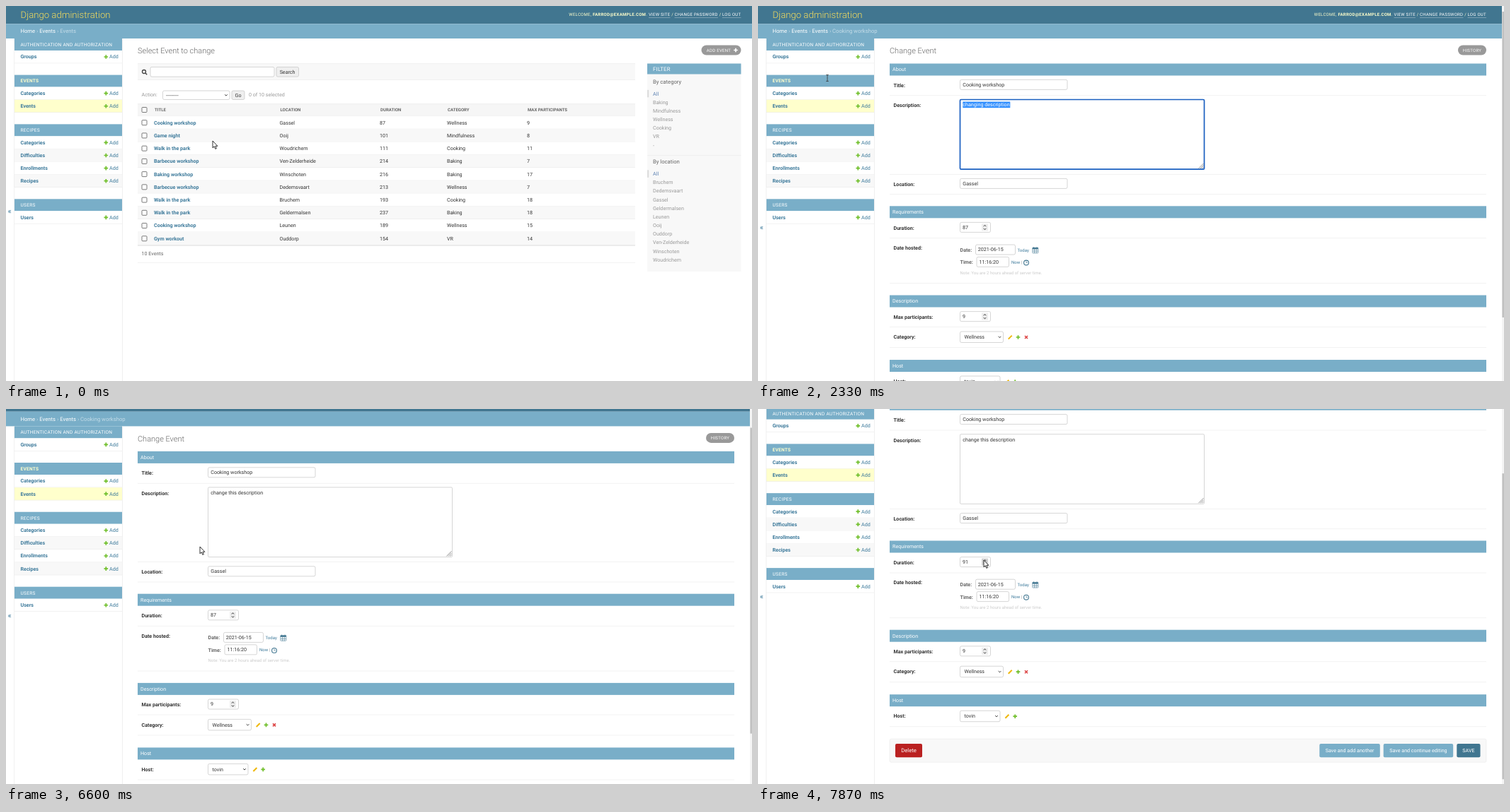
Animation of 1054 by 531 pixels, one loop 8 s. Source, as an HTML page:

```html
<!DOCTYPE html>
<html lang="en">
<head>
<meta charset="utf-8">
<title>Django administration</title>
<style>
  html, body { margin: 0; width: 100%; height: 100%; overflow: hidden; background: #fff; }
  svg { display: block; width: 1054px; height: 531px; }
  text { font: 7.14px Roboto, sans-serif; fill: #333; white-space: pre; text-rendering: geometricPrecision; }
  .b { font-weight: 700; }
  .s { font-size: 6.04px; }
  .m { font-size: 7.69px; }
  .cap { font-size: 6.59px; }
  .h1 { font-size: 10.98px; font-weight: 300; fill: #666; }
  .ls { letter-spacing: .27px; }
  .w { fill: #fff; }
  .link { fill: #3d7a9b; }
  .mute { fill: #999; }
  .grey { fill: #666; }
  .mid { text-anchor: middle; }
  .end { text-anchor: end; }
</style>
</head>
<body>
<svg id="stage" viewBox="0 0 1054 531"></svg>
<script>
const BLUE = '#79aec8', DARK = '#417690', LINE = '#eaeaea';

// ---- drawing helpers: text is placed by the centre of its line ----
const text = (x, cy, s, cls = '', more = '') =>
  `<text x="${x}" y="${cy}" dy=".342em" class="${cls}" ${more}>${s}</text>`;
const rect = (x, y, w, h, fill, r = 0, stroke = 'none', more = '') =>
  `<rect x="${x}" y="${y}" width="${w}" height="${h}" rx="${r}" fill="${fill}" stroke="${stroke}" stroke-width=".6" ${more}/>`;
const path = (d, stroke, width = 1, fill = 'none', more = '') =>
  `<path d="${d}" fill="${fill}" stroke="${stroke}" stroke-width="${width}" ${more}/>`;
const field = (x, y, w, h = 14) => rect(x, y, w, h, '#fff', 2, '#bbb');
const rule = (x, y, w, color = LINE) => rect(x, y, w, .6, color);
const plus = (x, y, color = '#70bf2b') => path(`M${x - 2.8} ${y}h5.6M${x} ${y - 2.8}v5.6`, color, 1.7);
const pencil = (x, y) => path(`M${x - 2.6} ${y + 2.6}l5-5`, '#efb80b', 2);
const cross = (x, y) => path(`M${x - 2} ${y - 2}l4 4m0-4l-4 4`, '#dd4646', 1.6);
const chevron = (x, y, k = 1) => path(`M${x - 1.8} ${y - .9 * k}l1.8 ${1.8 * k} 1.8 ${-1.8 * k}`, '#333', 1);
const checkbox = cy => rect(192, cy - 3.5, 7, 7, '#fff', 1, '#6b6b6b', 'style="stroke-width:.9"');
const button = (x, y, w, h, label, fill, cls = 'w') =>
  rect(x, y, w, h, fill, 2) + text(x + w / 2, y + h / 2, label, 'mid ' + cls);
const select = (x, y, w, h, label, pad) =>
  field(x, y, w, h) + text(x + pad, y + h / 2, label) + chevron(x + w - 5, y + h / 2);

function userLinks(dx) {
  const links = [[908, 30.5, 'VIEW SITE'], [944.5, 61.5, 'CHANGE PASSWORD'], [1012, 26.5, 'LOG OUT']];
  return text(906 + dx, 12, 'WELCOME, <tspan class="b">FARROD@EXAMPLE.COM</tspan>.', 's ls end', 'style="fill:#ffc"')
    + links.map(([x, w, s], i) => text(x + dx, 12, s, 's ls w') + rule(x + dx, 16.4, w, '#a0bbc8')
      + (i ? text(x - 4.3 + dx, 12, '/', 's', 'style="fill:#ffc"') : '')).join('');
}

const crumbs = (done, here) => text(20.5, 35.5,
  [...done, `<tspan style="fill:#c4dce8">${here}</tspan>`].join('<tspan style="fill:#c4dce8"> › </tspan>'), 'm w');

function sidebar() {
  const groups = { 'AUTHENTICATION AND AUTHORIZATION': ['Groups'], EVENTS: ['Categories', 'Events'],
    RECIPES: ['Categories', 'Difficulties', 'Enrollments', 'Recipes'], USERS: ['Users'] };
  let y = 46, out = '';
  for (const [title, rows] of Object.entries(groups)) {
    const current = title === 'EVENTS';
    out += rect(12, y, 152, 17, BLUE)
      + text(20.5, y + 8.6, title, 'cap ls w' + (current ? ' b' : ''), current ? 'style="fill:#ffc"' : '');
    y += 17.02;
    rows.forEach((name, i) => {
      out += rect(12, y, 152, 18.1, name === 'Events' ? '#ffc' : i % 2 ? '#f8f8f8' : '#fff')
        + rule(12, y + 17.6, 152) + text(20.5, y + 9, name, 'b link')
        + plus(141.3, y + 9) + text(146, y + 9, 'Add', 'link');
      y += 18.12;
    });
    y += 16.47;
  }
  return out;
}

function filter() {
  const list = (y, title, items) => text(914, y, title, 'm grey')
    + rect(906, y + 11.5, 2.2, 10.5, '#ddd')
    + items.split(' ').map((s, i) => text(914, y + 16.8 + 12.17 * i, s, i ? 'mute' : '', i ? '' : 'style="fill:#5b80b2"')).join('');
  return rect(906, 81.5, 132.5, 294.5, '#f8f8f8') + rect(906, 81.5, 132.5, 15, BLUE)
    + text(914, 89, 'FILTER', 'm ls w')
    + list(107.3, 'By category', 'All Baking Mindfulness Wellness Cooking VR -')
    + rule(906, 211.5, 132.5)
    + list(220.8, 'By location', 'All Bruchem Dedemsvaart Gassel Geldermalsen Leunen Ooij Ouddorp Ven-Zelderheide Winschoten Woudrichem');
}

const ROW0 = 165.2, ROW = 18.23;
function listPage() {
  const columns = [209, 386.5, 528, 623, 736];
  const rows = `Cooking workshop,Gassel,87,Wellness,9
Game night,Ooij,101,Mindfulness,8
Walk in the park,Woudrichem,111,Cooking,11
Barbecue workshop,Ven-Zelderheide,214,Baking,7
Baking workshop,Winschoten,216,Baking,17
Barbecue workshop,Dedemsvaart,213,Wellness,7
Walk in the park,Bruchem,193,Cooking,18
Walk in the park,Geldermalsen,237,Baking,18
Cooking workshop,Leunen,189,Wellness,15
Gym workout,Ouddorp,154,VR,14`.split('\n');
  let out = userLinks(0) + crumbs(['Home', 'Events'], 'Events')
    + text(186, 63.5, 'Select Event to change', 'h1')
    + rect(982.5, 55.5, 56, 14, '#999', 7) + text(989.8, 62.5, 'ADD EVENT', 's ls w') + plus(1031, 62.5, '#fff')
    + rect(186, 81.5, 703, 23, '#f8f8f8') + rule(186, 81.5, 703) + rule(186, 104.3, 703)
    + `<circle cx="195" cy="93" r="2.5" fill="none" stroke="#444" stroke-width="1.3"/>` + path('M197 95l2.2 2.3', '#444', 1.5)
    + field(204, 86.4, 175, 13.7)
    + rect(382, 86.4, 31.5, 13.7, '#efefef', 2, '#bbb') + text(397.6, 93.3, 'Search', 'mid')
    + text(191.5, 126, 'Action:', 'mute') + select(221.5, 120, 94.5, 12.5, '---------', 4.5)
    + rect(319, 120, 18, 12.5, '#efefef', 2, '#bbb') + text(328, 126.2, 'Go', 'mid')
    + text(343, 126, '0 of 10 selected', 'mute')
    + rect(186, 138.5, 703, 17.5, '#f6f6f6') + rule(186, 138.5, 703) + rule(186, 155.7, 703) + checkbox(147)
    + ['TITLE', 'LOCATION', 'DURATION', 'CATEGORY', 'MAX PARTICIPANTS']
      .map((s, i) => text(columns[i] + 1, 147.2, s, 's b grey')).join('');
  rows.forEach((row, i) => {
    const cy = ROW0 + ROW * i;
    out += rect(186, cy - 9.1, 703, ROW, i % 2 ? '#f8f8f8' : '#fff') + rule(186, cy + 8.6, 703) + checkbox(cy)
      + row.split(',').map((s, c) => text(columns[c], cy, s, c ? '' : 'b link title')).join('');
  });
  return out + rule(186, 338.8, 703, '#ccc') + text(191.5, 351, '10 Events', 'grey') + rule(186, 363, 703) + filter();
}

function spinner(y, value, id) {
  return field(285.5, y, 43) + text(289, y + 7, value, '', `id="${id}"`)
    + rect(316, y + 2, 9, 10, '#eee', 0, 'none', `id="${id}Spin"`)
    + chevron(320.5, y + 4.8, -.8) + chevron(320.5, y + 9.4, .8);
}

function formPage() {
  const label = (cy, s) => text(191.5, cy, s, 'b');
  const caption = (y, s) => rect(186, y, 843, 17, BLUE) + text(190, y + 8.5, s, 'w');
  return userLinks(-9.5) + crumbs(['Home', 'Events', 'Events'], 'Cooking workshop')
    + text(186, 63.5, 'Change Event', 'h1')
    + rect(989, 55.5, 40, 14, '#999', 7) + text(1009, 62.5, 'HISTORY', 's ls w mid')
    + caption(81.5, 'About') + caption(283.3, 'Requirements') + caption(409.5, 'Description') + caption(501, 'Host')
    + [126.5, 238, 266.3, 328.5, 392.3, 454.3, 483.3, 546.3].map(y => rule(186, y, 843)).join('')
    + label(112.5, 'Title:') + field(285.5, 104.4, 151.5) + text(289.3, 111.5, 'Cooking workshop')
    + label(141, 'Description:')
    + rect(285.5, 132.5, 345, 98.7, '#fff', 1.5, '#bbb', 'id="area"')
    + rect(289.3, 135.5, 67, 8.7, '#3390ff', 0, 'none', 'id="selection"')
    + text(289.3, 140, '', '', 'id="description"') + rect(0, 135.8, .7, 8.4, '#000', 0, 'none', 'id="caret"')
    + path('M622.5 230l7-7M625 230l4.5-4.5M627.5 230l2-2', '#777', .8)
    + label(252.5, 'Location:') + field(285.5, 244.4, 151.5) + text(289.3, 251.5, 'Gassel')
    + label(314.3, 'Duration:') + spinner(306.4, '87', 'duration')
    + label(342.8, 'Date hosted:')
    + text(285.5, 345.5, 'Date:', 'b grey') + field(307.5, 338, 56) + text(310.8, 345, '2021-06-15')
    + text(366.5, 345.8, 'Today', 's link')
    + rect(387.8, 342.2, 8, 7.6, '#fff', .5, DARK) + rect(387.8, 342.2, 8, 2.2, DARK)
    + path('M390.5 344v6M393.2 344v6M388 347h8M389.6 341v2M394 341v2', DARK, .6)
    + text(285.5, 363, 'Time:', 'b grey') + field(309, 355.4, 45.5) + text(312.5, 362.3, '11:16:20')
    + text(358, 363, 'Now', 's link') + text(372, 363, '|', 's mute')
    + `<circle cx="379" cy="363.5" r="3.4" fill="#fff" stroke="${DARK}" stroke-width="1.1"/>` + path('M379 361.2v2.3h1.8', DARK, .7)
    + text(285.5, 378, 'Note: You are 2 hours ahead of server time.', 's', 'style="fill:#ccc"')
    + label(440.3, 'Max participants:') + spinner(432.6, '9', 'max')
    + label(468.8, 'Category:') + select(285.5, 461, 61, 15.5, 'Wellness', 6)
    + pencil(356.3, 469) + plus(367.5, 469) + cross(379, 469)
    + label(531.8, 'Host:') + select(285.5, 524, 56.5, 15.5, 'tovin', 6) + pencil(352, 532) + plus(363.2, 532)
    + rect(186, 564, 843, 33, '#f8f8f8', 2, LINE)
    + button(194, 570.8, 38, 19.2, 'Delete', '#ba2121', 'w m')
    + button(793.3, 570.8, 85.5, 19.2, 'Save and add another', BLUE)
    + button(883.7, 570.8, 98.5, 19.2, 'Save and continue editing', BLUE)
    + button(987.3, 570.8, 33.2, 19.2, 'SAVE', DARK);
}

const stage = document.getElementById('stage');
stage.innerHTML = `<g id="page">${rect(0, 0, 1054, 25.3, DARK)}${rect(0, 25.3, 1054, 20.7, BLUE)}
  ${text(20.5, 12.3, 'Django administration', '', 'style="font-size:13.18px;font-weight:300;fill:#f5dd5d"')}
  ${rect(11.2, 46, .7, 700, LINE)}${rect(164, 46, .7, 700, LINE)}
  <g id="list">${listPage()}</g><g id="form">${formPage()}</g></g>
  <g id="side">${sidebar()}${text(5, 0, '«', 'mid link', 'id="toggle" style="font-size:11px"')}</g>
  <g id="bar">${rect(1051, 0, 3, 531, '#f4f4f4')}${rect(1051.4, 0, 2.6, 433, '#c1c1c1', 0, 'none', 'id="thumb"')}</g>
  <g id="mouse">
    ${path('M0 0V9.8L2.2 7.8L3.8 11.4L5.4 10.7L3.9 7.3H6.9Z', '#000', .8, '#fff', 'id="arrow"')}
    ${path('M-.9 .6Q0-.8 .9 .6V4.2L2.4 4.4 3.9 4.9 5.2 5.7V8.6L4.3 12H-.8L-3 8.2Q-3.6 6.6-2.2 6.8L-.9 8Z', '#000', .8, '#fff', 'id="hand"')}
    ${path('M-1.7-4.5H1.7M-1.7 4.5H1.7M0-4.5V4.5', '#333', .8, 'none', 'id="beam"')}
  </g>`;

const $ = Object.fromEntries([...stage.querySelectorAll('[id]')].map(e => [e.id, e]));
const titles = [...stage.querySelectorAll('.title')];
const show = (el, on) => el.setAttribute('visibility', on ? 'visible' : 'hidden');

// ---- timeline in ms ----
const MOUSE = [[0, 292, 191], [300, 280, 216], [500, 262, 211], [680, 250, 190], [866, 234.5, 167], [934, 234.5, 167],
  [1200, 250, 172], [1467, 380, 185], [1733, 453, 171], [1933, 383, 145], [2133, 383, 145], [2333, 98, 102],
  [5733, 98, 102], [5800, 81, 121], [5880, 110, 103], [6040, 185, 200], [6200, 215, 280], [6400, 215, 280],
  [6600, 274, 195], [6733, 287, 196], [6870, 287, 196], [7130, 300, 189], [7400, 317, 211], [7660, 319, 214]];
const SCROLL = [[6467, 0], [6533, 6], [6600, 21.6], [6667, 63], [6733, 96.8]];
const TYPING = [[3130, 3866, 10], [4000, 4800, 8], [4866, 5400, 5]];
const COUNTS = [7530, 7660, 7730, 7860];
const LOAD = 1200, FOCUS = 2130, TYPE = 3130, MOVE = 5795, BLUR = 6130;

function along(keys, t) {
  const i = keys.findIndex(k => k[0] > t);
  if (i < 0) return keys.at(-1).slice(1);
  if (!i) return keys[0].slice(1);
  const a = keys[i - 1], b = keys[i], p = (t - a[0]) / (b[0] - a[0]);
  return a.slice(1).map((v, n) => v + (b[n + 1] - v) * p);
}

function draw(t) {
  const [x, y] = along(MOUSE, t), [scroll] = along(SCROLL, t);
  const form = t >= LOAD, focus = t >= FOCUS && t < BLUR, typing = t >= TYPE;

  show($.list, !form); show($.form, form); show($.bar, form);
  $.page.setAttribute('transform', `translate(0 ${-scroll})`);
  $.side.setAttribute('transform', `translate(0 ${-Math.min(scroll, 46) - Math.max(0, scroll - 94.6)})`);
  $.toggle.setAttribute('y', form ? 313.5 : 290);
  $.thumb.setAttribute('y', 8 + scroll * .86);

  const typed = TYPING.reduce((sum, [a, b, n]) =>
    sum + Math.max(0, Math.min(n, Math.floor((t - a) / (b - a) * (n - 1) + 1.05))), 0);
  $.description.textContent = typing ? 'change this description'.slice(0, typed) : 'changing description';
  const start = Math.max(289.3, x), selecting = focus && !typing && start < 356;
  $.description.style.fill = selecting && x < 320 ? '#fff' : '';
  $.selection.setAttribute('x', start);
  $.selection.setAttribute('width', Math.max(0, 356.3 - start));
  $.area.setAttribute('stroke', focus ? '#1a5fc0' : '#bbb');
  $.area.setAttribute('stroke-width', focus ? 1.7 : .6);
  $.caret.setAttribute('x', 289.5 + $.description.getComputedTextLength());
  show($.selection, selecting); show($.caret, focus && typing);

  $.duration.textContent = 87 + COUNTS.filter(c => t >= c).length;
  $.durationSpin.setAttribute('fill', x > 316 && x < 325 && t > 7300 ? '#d2d2d2' : '#eee');

  const hover = form ? -1 : titles.findIndex((el, i) =>
    Math.abs(y - ROW0 - ROW * i) < 4.2 && x > 209 && x < 209 + el.getComputedTextLength());
  titles.forEach((el, i) => el.style.fill = i === hover ? '#036' : '');
  const dragging = t >= FOCUS && t < TYPE;
  const inArea = form && x > 286 && x < 630 && y + scroll > 133 && y + scroll < 231 && t < TYPE;
  const kind = hover >= 0 ? 'hand' : dragging || inArea ? 'beam' : 'arrow';
  const visible = t < TYPE || t >= MOVE;
  for (const name of ['arrow', 'hand', 'beam']) show($[name], visible && name === kind);
  $.mouse.setAttribute('transform', `translate(${x} ${y})`);
}

const TICK = 1000 / 15;
(function frame() {
  draw(Math.floor((performance.now() % 8000 + 5) / TICK) * TICK);
  requestAnimationFrame(frame);
})();
</script>
</body>
</html>
```
